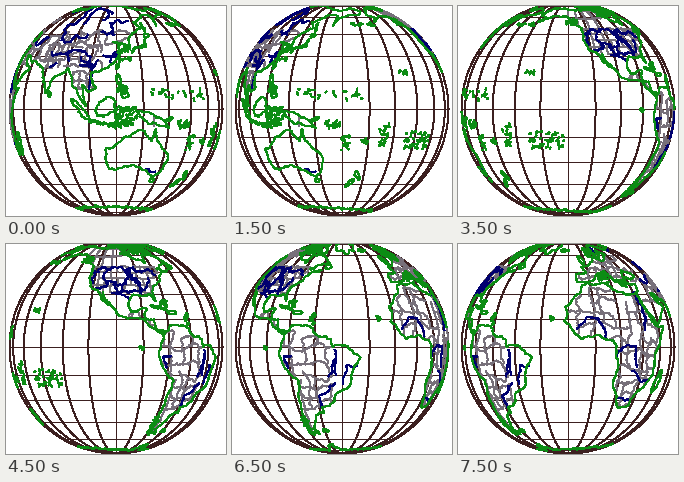
A matplotlib script for the animation above (8 s loop, 220 px wide and 210 px high).

```python
import numpy as np
import matplotlib.pyplot as plt
from matplotlib.animation import FuncAnimation
from matplotlib.path import Path

W, H, DPI = 220, 210, 100
CX, CY, R = 110, 103, 106.5
FRAMES, STEP, START = 16, 15, 120
PX = 72 / DPI

rng = np.random.default_rng(4)
coasts, rivers, borders = [], [], []
GAP = np.full((1, 2), np.nan)


def rough(v, amp, levels=4):
    """Midpoint displacement along a flat lon, lat, lon, lat... path."""
    p = np.reshape(v, (-1, 2)).astype(float)
    for _ in range(levels):
        d = np.diff(p, axis=0)
        n = np.clip(rng.normal(0, amp, (len(d), 1)), -2 * amp, 2 * amp)
        q = np.empty((2 * len(p) - 1, 2))
        q[::2] = p
        q[1::2] = (p[:-1] + p[1:]) / 2 + n * d[:, ::-1] * [1, -1]
        p = q
    return p


def add(group, p):
    group.append(np.vstack([p, GAP]))


def land(*v):
    p = rough(v + v[:2], 0.1, 5)
    add(coasts, p)
    return Path(p)


def river(*v):
    add(rivers, rough(v, 0.16))


def blob(lon, lat, a, b, tilt):
    """Ragged elliptical island."""
    t = np.linspace(0, 2 * np.pi, 9)
    c, s = np.cos(np.radians(tilt)), np.sin(np.radians(tilt))
    x, y = a * np.cos(t), b * np.sin(t)
    add(coasts, rough(np.c_[lon + x * c - y * s, lat + x * s + y * c], 0.16, 3))


def isles(lon, lat, dlon, dlat, n):
    """Scatter small specks of land around a centre."""
    for _ in range(n):
        p = np.array([lon, lat]) + rng.uniform(-1, 1, 2) * [dlon, dlat]
        add(coasts, p + rng.normal(0, 0.45, (3, 2)) / [np.cos(np.radians(p[1])), 1])


def web(group, shape, west, south, east, north, cell, jitter=0.3, keep=0.75):
    """Network of wobbly cell edges, clipped to the land."""
    g = np.stack(np.meshgrid(np.arange(west, east + 1, cell),
                             np.arange(south, north + 1, cell)), axis=-1)
    g = g + rng.uniform(-jitter, jitter, g.shape) * cell
    for u, v in ((g[1:], g[:-1]), (g[:, 1:], g[:, :-1])):
        for ends in zip(u.reshape(-1, 2), v.reshape(-1, 2)):
            if rng.random() < keep:
                p = rough(ends, jitter / 2)
                p[~shape.contains_points(p)] = np.nan
                add(group, p)


south_america = land(
    -77, 8, -72, 12, -62, 10.5, -51, 4, -50, 0, -35, -5.5, -39, -13, -41, -22,
    -48.5, -26, -53, -33.5, -58, -34.5, -57.5, -38, -62.5, -39.5, -65.5, -45,
    -69, -51, -66, -55, -72, -54, -75.5, -48, -73.5, -38, -70.3, -18.4, -76, -14,
    -81, -5, -80, 1, -77.5, 7.5)
north_america = land(
    -80, 7.5, -86, 11, -94.5, 16, -105.5, 20.5, -113, 31, -109.5, 23, -117, 32.5,
    -124, 40, -123.5, 49, -134, 58, -147, 61, -164, 54.5, -158, 58.5, -166, 62,
    -162, 66.5, -156, 71, -135, 69, -115, 68, -94, 70, -82, 68, -94, 60, -82, 55,
    -79, 52, -77, 60, -65, 59, -56, 52, -66, 50, -71, 47, -61, 46, -70, 43, -76, 37,
    -81.5, 31, -80.5, 25.5, -84, 30, -94, 29.5, -97.5, 25, -96, 19, -90.5, 21,
    -87, 21, -88.5, 16, -83.5, 15, -82, 9, -77, 8.5)
eurasia = land(
    190, 66, 179, 62, 163, 59, 157, 51, 160, 61, 136, 55, 140, 49, 129, 41, 129, 35.5,
    126, 37.5, 118, 39, 122, 37, 122, 30, 114, 22.5, 106, 20, 109, 12, 105, 9, 101, 13,
    103.5, 1.5, 98.5, 9, 94.5, 16, 91, 22.5, 80.5, 15, 78, 8.5, 73, 20, 67, 25, 56, 27,
    48.5, 30, 57, 24, 59, 22, 44, 12.7, 33, 29, 36, 36, 27, 37, 29, 41, 41, 42, 31, 46,
    23, 37, 13, 45.5, 18, 40, 9, 44, -1, 37.5, -9, 37.5, -8.5, 43.3, -1.5, 44, -4, 48.5,
    8, 54, 10, 57.5, 20, 54.5, 29, 60, 22, 65, 17, 57, 6, 59, 15, 69, 30, 71, 40, 66,
    68, 69, 104, 77, 140, 72)
africa = land(
    33, 29, 38, 18, 43, 11.5, 51, 11.5, 40, -4, 40.5, -15, 35, -22, 27, -33.5,
    19, -34.5, 12, -17, 13.5, -9, 9.5, 3.5, -8, 4.5, -17, 14, -16.5, 22, -6, 35,
    10, 37, 19.5, 31, 33, 31)
land(142.5, -11, 140.5, -17.5, 136, -12, 130, -13, 122, -18, 114, -22, 115.5, -34,
     124, -33.5, 131, -31.5, 138, -35, 146, -39, 150, -37, 153.5, -28, 146, -19)
land(131, -1, 138, -1.7, 147, -6.5, 150.5, -10.5, 143, -8.5, 138, -8, 133, -4)
land(130.5, 32, 136, 36, 141, 41, 140.5, 36, 131, 34)

# Antarctica: a wavy ring with the peninsula as a bump
a = np.arange(-180, 181, 6)
rim = -71 + 4 * np.sin(np.radians(a - 20)) + 9 * np.exp(-((a + 60) / 6) ** 2)
add(coasts, rough(np.c_[a, rim], 0.2))

for shape in ((114, 1, 6.5, 4, 50), (100.5, -.5, 8, 1.5, -47), (110, -7.3, 5, .7, -7),
              (121, -2, 3.5, 1.2, 80), (121.5, 16, 3, 1.2, 100), (124.8, 7.5, 2, 1.6, 0),
              (121, 23.7, 1.7, .7, 70), (143, 43.5, 2, 1.3, 20), (143, 50, 4, .6, 95),
              (80.7, 8, 1.6, 1, 100), (46.8, -19, 7, 2.2, 70), (146.7, -42, 1.6, 1.4, 0),
              (175.8, -38.5, 3.4, 1.2, -60), (170.5, -44, 4, 1.2, 45),
              (-3, 54.5, 4.2, 1.8, -65), (-19, 65, 5, 1.5, 0), (-41, 72, 15, 11, 0),
              (-79.5, 21.8, 5, .7, -15), (-71.3, 19, 3, .9, 0), (-56, 49, 2.5, 2, 0),
              (-72, 68, 11, 3.5, -35), (-110, 71, 7, 2, 0), (150.3, -5.5, 2.3, .7, 20)):
    blob(*shape)

for group in ((-157, 20.5, 2.5, 1.2, 7), (-148, -17, 11, 5, 38), (-172, -14, 4, 6, 16),
              (178, -18, 2, 1.5, 8), (167, -18, 2, 4, 16), (160, -9, 4, 2.5, 18),
              (158, 8, 18, 3, 24), (-91, -.5, 1.2, .8, 7), (-62, 15, 1, 3, 12),
              (-76, 24, 2.5, 2, 12), (-24, 16, 1, 1, 5), (-59.5, -51.7, 1.8, .7, 14),
              (-74, -48, 1.5, 7, 50), (-132, 55, 4, 3, 30), (-175, 52.5, 12, 1.2, 18),
              (-95, 74, 25, 5, 110), (-85, 64, 15, 4, 35), (124, 11, 2.5, 2, 26),
              (126, -4, 5, 5, 50), (121, -8.7, 5, .8, 30), (125, 32, 4, 5, 28),
              (25, 37, 3, 2, 20), (10, 63, 5, 5, 30), (10, 40, 4, 3, 20)):
    isles(*group)

web(borders, north_america, -122, 31, -72, 49, 4.5, 0.1)
web(borders, north_america, -135, 49, -95, 67, 9, 0.05)
web(borders, north_america, -98, 12, -83, 18, 3)
web(borders, south_america, -80, -36, -52, 6, 7)
web(borders, africa, -17, -34, 48, 34, 7.5, keep=0.8)
web(borders, eurasia, -6, 41, 40, 62, 6)
web(borders, eurasia, 36, 27, 81, 50, 9)
web(borders, eurasia, 70, 23, 112, 36, 4.5)
web(borders, eurasia, 95, 11, 108, 23, 4.5)
web(borders, eurasia, 84, 38, 135, 52, 8)
add(borders, rough((-69, -18, -70, -34, -72, -52), 0.05))
add(borders, rough((141, -3, 141, -9), 0))

web(rivers, north_america, -119, 33, -75, 48, 7, 0.4, 0.5)
web(rivers, eurasia, 76, 25, 118, 36, 7, 0.4, 0.5)
web(rivers, eurasia, 10, 44, 130, 68, 12, 0.4, 0.3)
river(-89.5, 29.5, -90, 37, -95, 47)
river(-89, 37, -95, 41, -104, 48)
river(-97, 26, -104, 30, -106.5, 36)
river(-49, -1.5, -48.3, -6, -48.5, -15)
river(-48.3, -6, -50.5, -10, -52.5, -16)
river(-37, -10.5, -42.5, -10, -44.5, -20)
river(-58.5, -34, -58.7, -27, -54.5, -25.5, -49, -20)
river(-74, -5, -78, -5, -76, -11)
river(12.5, -6, 18.5, 1, 25, 0, 26, -11)
river(6, 4.5, 4.5, 11.5, -3, 16.5, -10, 10)
river(31, 31, 32, 24, 32, 9)
river(17, -28.5, 27, -30)
river(36, -18, 28, -16, 23, -13)
river(106, 10, 105, 17, 98, 29)
river(139, -35, 147, -36)


def project(lon, lat, lon0=0):
    u, v = np.radians(lon - lon0), np.radians(lat)
    x = CX + R * np.cos(v) * np.sin(u)
    y = CY - R * np.sin(v)
    return np.where(np.cos(u) < 0, np.nan, x), y


fig = plt.figure(figsize=(W / DPI, H / DPI), dpi=DPI, facecolor="white")
ax = fig.add_axes([0, 0, 1, 1])
ax.set(xlim=(0, W), ylim=(H, 0))
ax.axis("off")


def stroke(x, y, color, width, z):
    return ax.plot(x, y, color=color, lw=width * PX, antialiased=False, zorder=z)[0]


# The globe turns one grid step at a time, so the graticule stands still
GRID = "#3c2020"
arc = np.linspace(-90, 90, 121)
for deg in range(-75, 90, 15):
    stroke(*project(np.full(121, deg), arc), GRID, 1, 1)
    stroke(*project(arc[[0, -1]] * 0.9999, np.full(2, deg)), GRID, 1, 1)
t = np.linspace(0, 2 * np.pi, 241)
stroke(CX + R * np.cos(t), CY + R * np.sin(t), GRID, 1, 1)

layers = [(np.vstack(paths), stroke([], [], color, width, z))
          for paths, color, width, z in ((borders, "#77707a", 1, 2),
                                         (rivers, "#000070", 1.1, 3),
                                         (coasts, "#0c8c14", 1.2, 4))]


def draw(i):
    for pts, art in layers:
        art.set_data(*project(pts[:, 0], pts[:, 1], START + STEP * i))
    return [art for _, art in layers]


anim = FuncAnimation(fig, draw, frames=FRAMES, interval=500, repeat=True,
                     repeat_delay=0, blit=False)
plt.show()
```
